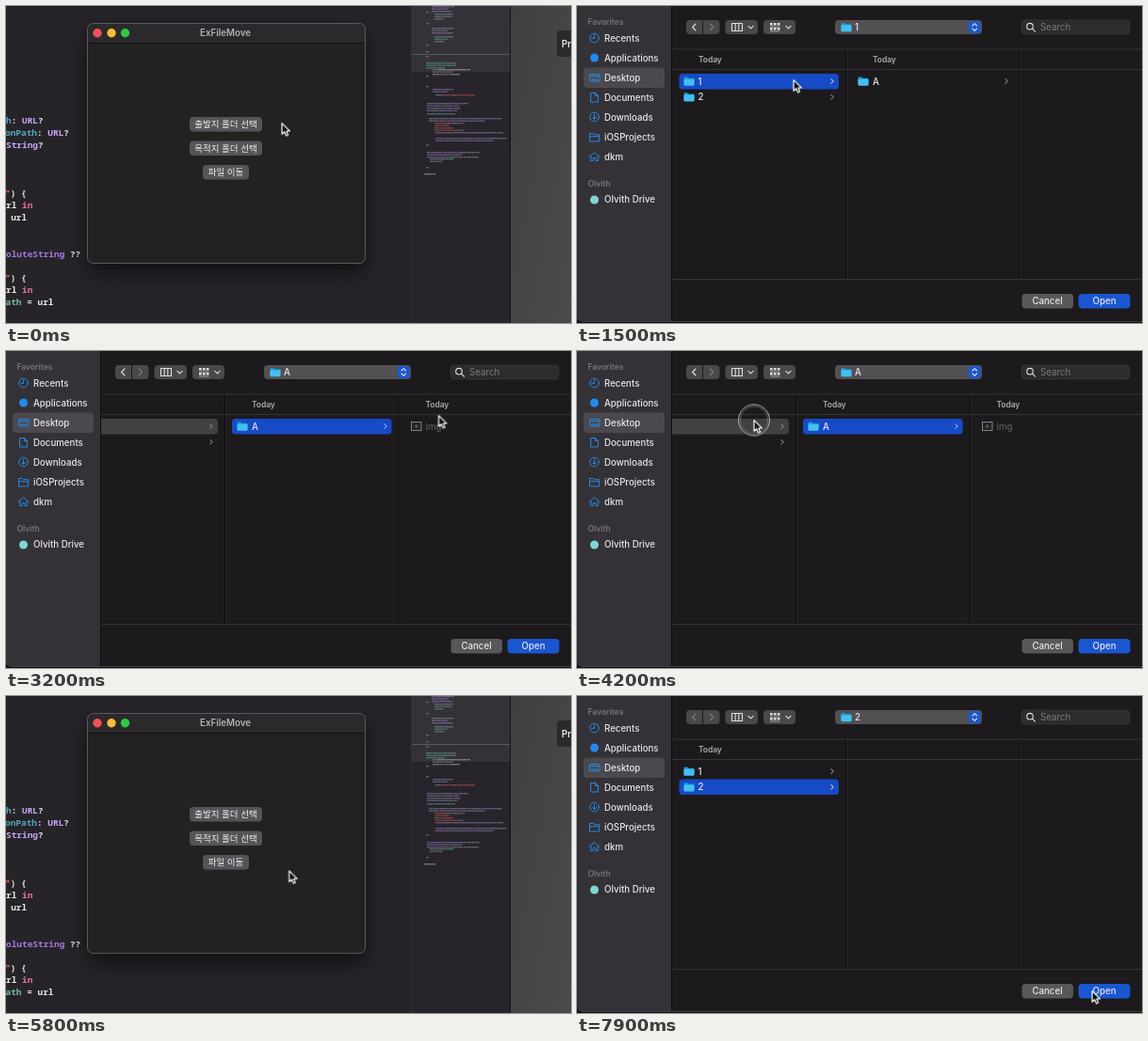
These frames come from a looping animation (600x337 px, 8 s). An HTML page:

```html
<!DOCTYPE html>
<html lang="ko">
<head>
<meta charset="utf-8">
<title>ExFileMove</title>
<style>
html, body { margin: 0; width: 100%; height: 100%; overflow: hidden; background: #262429; }
svg { display: block; width: 100%; height: 100%; }
text { font: 500 9.7px Inter, Roboto, sans-serif; fill: #e8e7e9; white-space: pre; }
.code text { font: 600 9.45px "Noto Sans Mono", "DejaVu Sans Mono", monospace; }
.btn text { font: 500 9.5px "Noto Sans CJK KR", "Noto Sans CJK", sans-serif; text-anchor: middle; fill: #f0eff0; }
.head { font-size: 8.5px; font-weight: 600; fill: #77757a; }
.day { font-size: 8.5px; font-weight: 600; letter-spacing: -.1px; fill: #a9a8aa; }
.mid { text-anchor: middle; }
.bold { font-weight: 600; }
.line { fill: none; stroke-linecap: round; stroke-linejoin: round; }
.blue { stroke: #2389ea; stroke-width: 1; }
.white { stroke: #dedddf; stroke-width: 1.1; }
.dim { stroke: #7b797d; stroke-width: 1.1; }
.pale { stroke: #bccaf2; stroke-width: 1; }

/* one shared 8 s clock */
#dialog, .one, .deep, .two, .back, .noback, .ring { animation: 8s step-end infinite; }
#dialog { animation-name: dialog; }
.one { animation-name: one; }
.deep { animation-name: deep; }
.two { animation-name: two; }
.back { animation-name: back; }
.noback { animation-name: noback; }
.ring { animation-name: ring; }
#columns { animation: scroll 8s ease-in-out infinite; }
#cursor { animation: move 8s ease-in-out infinite; }

@keyframes dialog { 0%, 67.4% { opacity: 0 } 9.9%, 79.9% { opacity: 1 } }
@keyframes one { 0%, 53.7% { opacity: 1 } 28.7%, 91.2% { opacity: 0 } }
@keyframes deep { 0%, 53.7% { opacity: 0 } 28.7% { opacity: 1 } }
@keyframes two { 0% { opacity: 0 } 91.2% { opacity: 1 } }
@keyframes back { 0% { opacity: 1 } 79.9% { opacity: 0 } }
@keyframes noback { 0% { opacity: 0 } 79.9% { opacity: 1 } }
@keyframes ring {
  0%, 8%, 28.7%, 53.7%, 67.4%, 78.7%, 91.2% { opacity: 0 }
  6.2%, 27.4%, 52.4%, 66.2%, 77.4%, 89.9% { opacity: 1 }
}
@keyframes scroll {
  0%, 28.75% { transform: translateX(0) }
  31.25%, 53.75% { transform: translateX(-53px) }
  56.25%, 100% { transform: translateX(0) }
}
@keyframes move {
  0% { transform: translate(293px, 124.5px) }
  5%, 8.7% { transform: translate(250px, 126px) }
  15%, 20% { transform: translate(230px, 78.5px) }
  26%, 30% { transform: translate(335px, 78px) }
  37.5%, 41% { transform: translate(459.5px, 68.5px) }
  50%, 54% { transform: translate(188px, 73.5px) }
  57%, 65% { transform: translate(190.5px, 79px) }
  66.25% { transform: translate(540px, 313px) }
  67.5% { transform: translate(518px, 306px) }
  75%, 78.2% { transform: translate(236px, 150px) }
  80%, 81.2% { transform: translate(224px, 137.5px) }
  87.5%, 91.2% { transform: translate(195px, 96px) }
  97.5%, 100% { transform: translate(547px, 313.5px) }
}
</style>
</head>
<body>
<svg viewBox="0 0 600 337" preserveAspectRatio="none">
  <defs>
    <g id="folder">
      <path d="M.5 1.5Q.5.5 1.5.5H4.3l1.3 1.2h4.9Q11.500 1.700 11.500 2.700V8H.5Z" fill="#199bd4"/>
      <rect x=".5" y="2.8" width="11" height="7" rx="1" fill="#43c0f0"/>
    </g>
    <path id="chev" class="line" d="M-1.2-2.4 1.2 0-1.2 2.4"/>
    <path id="down" class="line white" d="M-2.5-1.2 0 1.3 2.5-1.2"/>
    <path id="prev" d="M133 15h-13q-4 0-4 4v7q0 4 4 4h13Z" fill="#4a484b"/>
    <path id="prevArrow" class="line" d="M126 19l-3.3 3.5 3.3 3.5"/>
    <linearGradient id="panel" x2="1" y2="1">
      <stop stop-color="#403f41"/><stop offset="1" stop-color="#4a494b"/>
    </linearGradient>
    <filter id="shadow" x="-25%" y="-25%" width="150%" height="160%">
      <feDropShadow dx="0" dy="10" stdDeviation="12" flood-color="#000" flood-opacity=".6"/>
    </filter>
    <clipPath id="editorArea"><rect width="430" height="337"/></clipPath>
    <clipPath id="browser"><rect x="101" y="46" width="499" height="245"/></clipPath>
  </defs>

  <g id="editor">
    <rect width="600" height="337" fill="#262429"/>
    <g class="code" transform="translate(0 .5)">
      <text x="0" y="124"><tspan fill="#4fa8bd">h</tspan>: <tspan fill="#c9a6f0">URL</tspan>?</text>
      <text x="-1" y="137"><tspan fill="#4fa8bd">onPath</tspan>: <tspan fill="#c9a6f0">URL</tspan>?</text>
      <text x="0" y="150"><tspan fill="#c9a6f0">String</tspan>?</text>
      <text x="-1" y="201"><tspan fill="#f0695f">"</tspan>) {</text>
      <text x="0" y="214">rl <tspan fill="#f06fa8">in</tspan></text>
      <text x="-.5" y="227"> url</text>
      <text x="0" y="266"><tspan fill="#a678e0">oluteString</tspan> ??</text>
      <text x="-1" y="291"><tspan fill="#f0695f">"</tspan>) {</text>
      <text x="0" y="304">rl <tspan fill="#f06fa8">in</tspan></text>
      <text x="-.5" y="317"><tspan fill="#74b8a8">ath</tspan> = url</text>
    </g>
    <rect x="430" width="106" height="337" fill="#27252b"/>
    <rect x="430" width="106" height="70" fill="#343239"/>
    <path d="M430 51.5h106" stroke="#5b5960"/>
    <path d="M430.5 0v337" stroke="#343238"/>
    <g id="minimap"></g>
    <rect x="536" width="64" height="337" fill="url(#panel)"/>
    <path d="M535.5 0v337" stroke="#151416"/>
    <rect x="585" y="26" width="30" height="28" rx="4" fill="#2a292b"/>
    <text x="590" y="44" class="bold">Pr</text>

    <g clip-path="url(#editorArea)">
      <rect x="86.5" y="18.5" width="295" height="255" rx="6" fill="#232124" filter="url(#shadow)"/>
    </g>
    <path d="M87 39V25q0-6 6-6h282q6 0 6 6v14Z" fill="#2b292c"/>
    <path d="M87 39.5h294" stroke="#111012"/>
    <rect x="86.5" y="18.5" width="295" height="255" rx="6" fill="none" stroke="#5c5a5e"/>
    <circle cx="97" cy="28.8" r="4.7" fill="#f4505a"/>
    <circle cx="112" cy="28.8" r="4.7" fill="#f6bd3b"/>
    <circle cx="126.5" cy="28.8" r="4.7" fill="#2fc845"/>
    <text x="233" y="32.2" class="mid bold" style="fill:#b5b3b6">ExFileMove</text>
    <g class="btn" fill="#565458">
      <rect x="195" y="118" width="77" height="15.5" rx="4"/>
      <rect x="195" y="143.5" width="77" height="15.5" rx="4"/>
      <rect x="209" y="169" width="49" height="15.5" rx="4"/>
      <text x="233.5" y="129">출발지 폴더 선택</text>
      <text x="233.5" y="154.5">목적지 폴더 선택</text>
      <text x="233.5" y="180">파일 이동</text>
    </g>
  </g>

  <g id="dialog">
    <rect width="600" height="337" fill="#0d0c0e"/>
    <path d="M0 0h600v335.5H5q-5 0-5-5Z" fill="#1c1a1c"/>
    <path d="M0 0h100v335.5H5q-5 0-5-5Z" fill="#343236"/>
    <path d="M100.5 0v335.5" stroke="#0c0b0d"/>
    <path d="M5 335.5h595" stroke="#444246"/>

    <g id="sidebar">
      <text x="11.5" y="20.3" class="head">Favorites</text>
      <rect x="7" y="65.500" width="86" height="21.5" rx="4" fill="#4b494d"/>
      <text x="29" y="37.7">Recents</text>
      <text x="29" y="58.7">Applications</text>
      <text x="29" y="79.7">Desktop</text>
      <text x="29" y="100.7">Documents</text>
      <text x="29" y="121.7">Downloads</text>
      <text x="29" y="142.7">iOSProjects</text>
      <text x="29" y="163.7">dkm</text>
      <text x="11.5" y="192" class="head">Olvith</text>
      <text x="29" y="209.2">Olvith Drive</text>
      <g class="line blue">
        <circle cx="18.5" cy="34" r="4.8"/><path d="M18.5 31v3.3h-2.7"/>
        <rect x="13.5" y="72.5" width="10.5" height="7.5" rx="1"/><path d="M14 74.500h9.500M15.500 78.200h6.500"/>
        <path d="M15 92.5h4.5l3 3v6.5H15ZM19.5 92.5v3h3"/>
        <circle cx="18.5" cy="118" r="4.8"/><path d="M18.5 115.3v5M16.5 118.5l2 2 2-2"/>
        <path d="M13.5 143.5v-8h3.7l1.2 1.2h5.3v6.8ZM13.500 138.700h10.200"/>
        <path d="M13 160.5l5.5-5 5.5 5M14.7 159.5v5h2.5v-3h2.6v3h2.5v-5"/>
      </g>
      <circle cx="18.5" cy="55" r="4.5" fill="#2389ea"/>
      <circle cx="18.5" cy="206" r="4.5" fill="#7fd6d0"/>
    </g>

    <g id="toolbar">
      <use href="#prev"/>
      <use href="#prevArrow" class="back white"/>
      <use href="#prevArrow" class="noback dim"/>
      <path d="M134 15h13.500q4 0 4 4v7q0 4-4 4H134Z" fill="#4a484b"/>
      <path class="line dim" d="M141.300 19l3.300 3.500-3.300 3.500"/>
      <g fill="#4a484b">
        <rect x="157.5" y="15" width="34.5" height="15" rx="4"/>
        <rect x="198" y="15" width="34" height="15" rx="4"/>
      </g>
      <path class="line white" d="M164.500 18.500h11v8h-11ZM168.200 18.500v8M171.800 18.500v8"/>
      <use href="#down" x="184.5" y="22.5"/>
      <path d="M205 19.3h10.5M205 24.3h10.5" stroke="#dedddf" stroke-width="2.4" stroke-dasharray="2.7 1.2"/>
      <path d="M205 22h10.5M205 27h10.5" stroke="#b5b3b6" stroke-width=".8"/>
      <use href="#down" x="224.5" y="22.5"/>
      <rect x="274" y="15" width="156" height="15" rx="4" fill="#525053"/>
      <use href="#folder" x="280" y="17.5"/>
      <text x="295" y="26" class="one">1</text>
      <text x="295" y="26" class="deep">A</text>
      <text x="295" y="26" class="two">2</text>
      <rect x="416" y="16" width="12.5" height="13" rx="3" fill="#1b58d2"/>
      <path class="line white" d="M420 21l2.300-2.300 2.300 2.300M420 24l2.300 2.300 2.300-2.300"/>
      <rect x="472" y="15" width="115" height="15" rx="4" fill="#2d2b2e" stroke="#3d3b3e" stroke-width=".7"/>
      <circle cx="481" cy="21.7" r="3.3" class="line white"/>
      <path class="line white" d="M483.500 24.200l3 3"/>
      <text x="492" y="26" style="fill:#7c7a7e;font-weight:400">Search</text>
    </g>

    <g clip-path="url(#browser)">
      <g id="columns">
        <path d="M285.5 46v245M470 46v245" stroke="#070608"/>
        <path d="M286.5 46v245M471 46v245" stroke="#343235" stroke-width=".6"/>
        <text x="129" y="60.3" class="day">Today</text>
        <rect class="one" x="108.500" y="72" width="169.5" height="16.5" rx="3.500" fill="#174ac6"/>
        <rect class="deep" x="108.500" y="72" width="169.5" height="16.5" rx="3.500" fill="#414042"/>
        <rect class="two" x="108.500" y="88.500" width="169.5" height="16.5" rx="3.500" fill="#174ac6"/>
        <use href="#folder" x="113" y="75"/><text x="128.500" y="83.500">1</text>
        <use href="#folder" x="113" y="91.7"/><text x="128.500" y="100.200">2</text>
        <use href="#chev" x="271" y="80" class="dim"/>
        <use href="#chev" x="271" y="96.7" class="dim"/>
        <use href="#chev" x="271" y="80" class="pale one"/>
        <use href="#chev" x="271" y="96.7" class="pale two"/>

        <g class="one">
          <text x="314" y="60.3" class="day">Today</text>
          <use href="#folder" x="298" y="75"/><text x="314" y="83.5">A</text>
          <use href="#chev" x="456" y="80" class="dim"/>
        </g>
        <g class="deep">
          <rect x="293" y="72" width="169.5" height="16.5" rx="3.500" fill="#174ac6"/>
          <text x="314" y="60.3" class="day">Today</text>
          <use href="#folder" x="298" y="75"/><text x="314" y="83.5">A</text>
          <use href="#chev" x="456" y="80" class="pale"/>
          <text x="498.5" y="60.3" class="day">Today</text>
          <rect x="483.5" y="75.5" width="10.5" height="9" fill="#242224" stroke="#848286"/>
          <circle cx="488.7" cy="80" r="1.7" fill="#58565a"/>
          <text x="498.5" y="83.5" style="fill:#5d5b5f">img</text>
        </g>
      </g>
    </g>
    <path d="M101 46h499M101 67.5h499M101 290.5h499" stroke="#39373a" stroke-width=".9"/>

    <rect x="472.5" y="306" width="54.5" height="15.5" rx="4" fill="#59575a"/>
    <text x="499.5" y="317" class="mid">Cancel</text>
    <rect x="532.5" y="306" width="55" height="15.5" rx="4" fill="#1a56d0"/>
    <text x="560" y="317" class="mid">Open</text>
  </g>

  <g id="cursor">
    <g class="ring" fill="none">
      <circle r="16.5" stroke="#b5b4b6" stroke-width="1"/>
      <circle r="14.7" stroke="#747276" stroke-width=".8"/>
    </g>
    <path d="M0 0V11L2.500 8.700 4.300 12.600 6.200 11.800 4.500 8H8Z" transform="scale(1.06)" fill="#111" stroke="#fff" stroke-width="1.1" stroke-linejoin="round"/>
  </g>
</svg>
<script>
// Each block of miniature code: top, rows, indent, longest row, accent colour
const blocks = [
  [0, 3, 452, 24, "#9a78c0"], [8, 3, 455, 20, "#62a890"], [23, 3, 452, 24, "#9a78c0"],
  [32, 3, 455, 20, "#62a890"], [60, 3, 446, 32, "#62a890"], [67, 3, 453, 40, "#b6b4ba"],
  [88, 2, 453, 22, "#9a78c0"], [94, 1, 456, 42, "#c75550"], [103, 4, 447, 44, "#9a78c0"],
  [114, 1, 447, 30, "#62a890"], [119, 2, 449, 78, "#9a78c0"], [124, 4, 455, 32, "#c75550"],
  [134, 1, 456, 72, "#9a78c0"], [140, 2, 456, 76, "#9a78c0"], [155, 3, 447, 56, "#9a78c0"],
  [162, 2, 450, 26, "#62a890"], [178, 1, 444, 12, "#b6b4ba"]
];
let seed = 11;
const rand = () => (seed = seed * 16807 % 2147483647) / 2147483647;
const map = document.getElementById("minimap");

function bar(x, y, w, color) {
  const r = document.createElementNS("http://www.w3.org/2000/svg", "rect");
  const attrs = { x, y, width: w, height: 1.4, fill: color, opacity: 0.55 };
  for (const key in attrs) r.setAttribute(key, attrs[key]);
  map.append(r);
}

for (const [top, rows, left, longest, accent] of blocks) {
  for (let i = 0; i < rows; i++) {
    const end = left + longest * (i ? 0.5 + rand() / 2 : 1);
    for (let x = left; x < end;) {
      const w = Math.min(3 + rand() * 9, end - x);
      bar(x, top + i * 2.5, w, rand() < 0.6 ? accent : "#8f8d94");
      x += w + 0.4;
    }
  }
}
for (const y of [6, 18, 41, 48, 53, 74, 85, 147, 171]) bar(446, y, 3, "#8f8d94");
</script>
</body>
</html>
```
